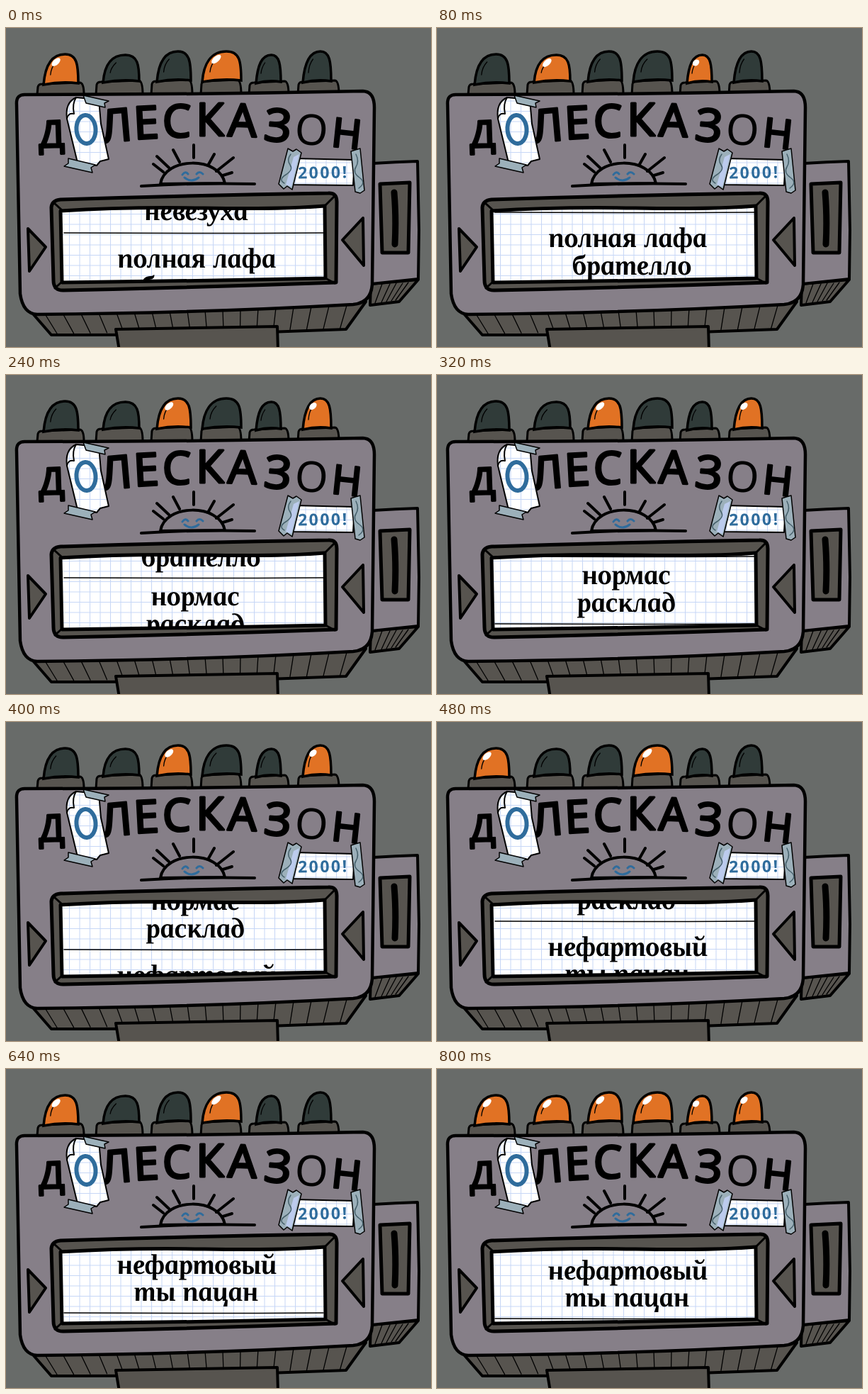
An HTML page that plays this animation: 600 px wide and 450 px high, repeating every 1920 ms.

```html
<!DOCTYPE html>
<html lang="ru">
<head>
<meta charset="utf-8">
<title>Автомат предсказаний</title>
<style>
html, body { margin: 0; width: 100%; height: 100%; overflow: hidden; background: #686b69; }
svg { display: block; width: 100vw; height: 100vh; stroke-width: 4; }
.line { fill: none; stroke: #000; stroke-linecap: round; stroke-linejoin: round; }
.body, .dark, .paper, .tape { stroke: #000; stroke-linejoin: round; }
.body { fill: #867f88; }
.dark { fill: #57544f; }
.paper { fill: url(#grid); stroke-width: 2; }
.tape { fill: #9cb0ba; stroke-width: 1.5; }
.blue { fill: none; stroke: #2f6c9c; stroke-linecap: round; }
.thin { stroke-width: 1.3; }
#title text { font-family: "Noto Sans", sans-serif; stroke: #000; stroke-linejoin: round; text-anchor: middle; }
#tape text { font: italic bold 40px "Liberation Serif", "Times New Roman", serif; text-anchor: middle; }
</style>
</head>
<body>
<svg viewBox="0 0 600 450">
  <defs>
    <pattern id="grid" width="14.5" height="14.5" patternUnits="userSpaceOnUse" x="89" y="262">
      <path fill="#fff" d="M0 0H15V15H0Z"/>
      <path fill="none" stroke="#c6d6f6" stroke-width="1" d="M.5 0V15M0 .5H15"/>
    </pattern>
    <clipPath id="window"><path d="M78 257L449 252L450 353L79 358Z"/></clipPath>
  </defs>

  <!-- coin box -->
  <path class="dark" d="M515 361L582 355L555 386L514 391Z"/>
  <path class="line thin" d="M521 388L531 361M530 387L542 361M537 386L551 360M544 385L560 360M550 384L568 359"/>
  <path class="body" d="M518 191Q550 189 581 188L583 285L582 354L516 361Z"/>
  <path class="dark" stroke-width="5" d="M528 220L570 218L568 317L531 317Z"/>
  <path class="line" stroke-width="9" d="M548 232Q551 268 549 305"/>

  <!-- underside and stand -->
  <path class="dark" d="M37 402L64 433Q270 434 480 425L508 386Z"/>
  <path id="ribs" class="line thin"/>
  <path class="dark" d="M160 455L155 425L383 421L384 455Z"/>

  <g id="bulbs"></g>

  <path class="body" stroke-width="4.5" d="M28 94Q14 93 15 108Q18 250 20 375Q24 403 44 404Q280 402 490 390Q515 388 517 362L520 112Q520 90 504 89Q270 94 28 94Z"/>
  <g id="title"></g>

  <!-- sun -->
  <path class="body" d="M218 220C224 181 302 181 309 219Z"/>
  <path class="line" d="M191 223Q270 218 351 220M265 165V183M236 172L245 189M294 178L285 194M321 183L297 202M213 181L230 197M208 192L222 203M319 204L306 208"/>
  <path class="blue" stroke-width="3" d="M249 207Q253 201 257 206M269 206Q273 201 278 206M252 211Q262 219 272 211"/>

  <!-- taped letter -->
  <path class="paper" d="M99 98L131 101L134 135L145 185L133 188L128 194L101 190L86 128Q83 105 99 98Z"/>
  <path class="line" stroke-width="2" d="M86 128Q88 119 96 121Q93 107 99 98"/>
  <path class="tape" d="M109 95L145 103L139 106L140 112L113 106Z"/>
  <path class="tape" d="M88 184L126 193L120 197L122 204L82 195L88 191Z"/>
  <ellipse class="blue" stroke-width="6" cx="113" cy="143" rx="13.5" ry="20" transform="rotate(-4 113 143)"/>

  <!-- model number -->
  <path class="paper" d="M407 184L492 186L490 222L400 221Z"/>
  <path class="tape" d="M398 170L405 174L410 171L417 176L404 228L397 223L392 227L385 220Z"/>
  <path fill="#bccbed" d="M406 182L414 178L403 224L395 221Z"/>
  <path class="tape" d="M487 174L493 172L500 170L506 229L500 233L493 231Z"/>
  <path class="line" stroke-width="1.5" style="stroke:#46606b" d="M402 178Q396 186 401 193T395 207T393 219M494 178Q499 188 494 196T499 211T498 226"/>
  <text transform="translate(448 212) rotate(-1)" text-anchor="middle" fill="#2f6c9c" font-family="Open Sans, sans-serif" font-size="23" font-weight="bold" letter-spacing="2.5">2000!</text>

  <!-- screen -->
  <path class="dark" stroke-width="5" d="M77 242Q270 236 455 233Q467 232 467 245L466 359Q270 366 82 370Q67 371 67 356L64 253Q65 243 77 242Z"/>
  <path class="line" stroke-width="3" d="M67 246L78 256M465 236L450 251M451 353L464 360M69 367L79 358"/>
  <path fill="url(#grid)" d="M78 257L449 252L450 353L79 358Z"/>
  <g clip-path="url(#window)"><g id="tape"></g></g>
  <path class="line" stroke-width="5" d="M77 258Q170 252 280 254T450 251L451 353Q260 357 79 359Z"/>
  <path class="dark" d="M31 283L56 309L33 343Z"/>
  <path class="dark" d="M504 268L475 299L505 335Z"/>
</svg>
<script>
const byId = id => document.getElementById(id);

let ribs = "";
for (let i = 0; i < 18; i++) {
  const top = 56 + i * 25, bottom = 72 + i * 23.5;
  ribs += `M${top} ${405 - i * .8}L${bottom} ${431 - i * .4}`;
}
byId("ribs").setAttribute("d", ribs);

// left, right, top, bottom of each dome; left, right of its base
const bulbs = [
  [53, 102, 37, 80, 44, 110], [137, 188, 38, 77, 127, 193], [213, 261, 33, 76, 205, 263],
  [277, 332, 33, 76, 275, 332], [353, 388, 38, 78, 343, 399], [419, 459, 33, 77, 412, 470]
];
byId("bulbs").innerHTML = bulbs.map(([l, r, t, b, bl, br]) => {
  const w = r - l, x = l + w * .36, y = t + 11;
  return `<path class="dark" stroke-width="3" d="M${bl} 94L${bl + 1} ${b + 3}Q${bl + 2} ${b - 1} ${bl + 7} ${b - 1}L${br - 6} ${b - 3}Q${br} ${b - 3} ${br} 94Z"/>
    <path class="dome" stroke="#000" stroke-width="3.5" d="M${l} ${b}C${l + 2} ${b - 25} ${l + w * .22} ${t} ${l + w * .62} ${t}C${r - 2} ${t} ${r} ${t + 14} ${r} ${b - 2}Q${l + w / 2} ${b - 5} ${l} ${b}Z"/>
    <path class="line thin" d="M${l + w * .2} ${b - 14}Q${l + w * .22} ${t + 18} ${x} ${y}"/>
    <ellipse class="shine" fill="#fff" cx="${x}" cy="${y}" rx="${w * .15}" ry="4" transform="rotate(-42 ${x} ${y})"/>`;
}).join("");

// letter, centre, baseline, angle, size, extra weight
byId("title").innerHTML = [
  ["Д", 65, 168, -2, 52, 3], ["Л", 157, 160, -5, 64, 3], ["Е", 199, 156, -3, 64, 3],
  ["С", 241, 154, 0, 64, 3], ["К", 288, 152, 0, 64, 3], ["А", 333, 153, 2, 64, 3],
  ["З", 382, 160, 5, 64, 3], ["О", 430, 165, 4, 60, 0], ["Н", 479, 169, 6, 57, 3]
].map(([c, x, y, a, s, w]) =>
  `<text transform="translate(${x} ${y}) rotate(${a})" font-size="${s}" stroke-width="${w}">${c}</text>`
).join("");

const words = [
  ["невезуха", 270, 271], ["полная лафа", 271, 338], ["брателло", 277, 377],
  ["нормас", 269, 432], ["расклад", 269, 471], ["нефартовый", 271, 537], ["ты пацан", 270, 575]
];
byId("tape").innerHTML =
  words.map(([s, x, y]) => `<text transform="translate(${x} ${y}) skewX(9)">${s}</text>`).join("") +
  [289, 393, 488, 592].map(y => `<path class="line" stroke-width="1.6" d="M82 ${y}Q260 ${y + 1} 448 ${y}"/>`).join("");

const STEP = 80, LOOP = 1920;
const scroll = [0, 29, 68, 107, 137, 167, 207, 232, 248, 244, 240];
const phase = [0, 1, 1, 2, 2, 2, 0, 0, 0, 0];
const domes = document.querySelectorAll(".dome"), shines = document.querySelectorAll(".shine");
const start = performance.now();

function draw() {
  const time = (performance.now() - start) % LOOP;
  const step = Math.min(Math.floor(time / STEP), 10);
  byId("tape").setAttribute("transform", `translate(0 ${-scroll[step]})`);
  domes.forEach((dome, i) => {
    const on = step === 10 || i % 3 === phase[step];
    dome.setAttribute("fill", on ? "#e17224" : "#303b39");
    shines[i].setAttribute("opacity", on ? 1 : 0);
  });
  requestAnimationFrame(draw);
}
draw();
</script>
</body>
</html>
```
